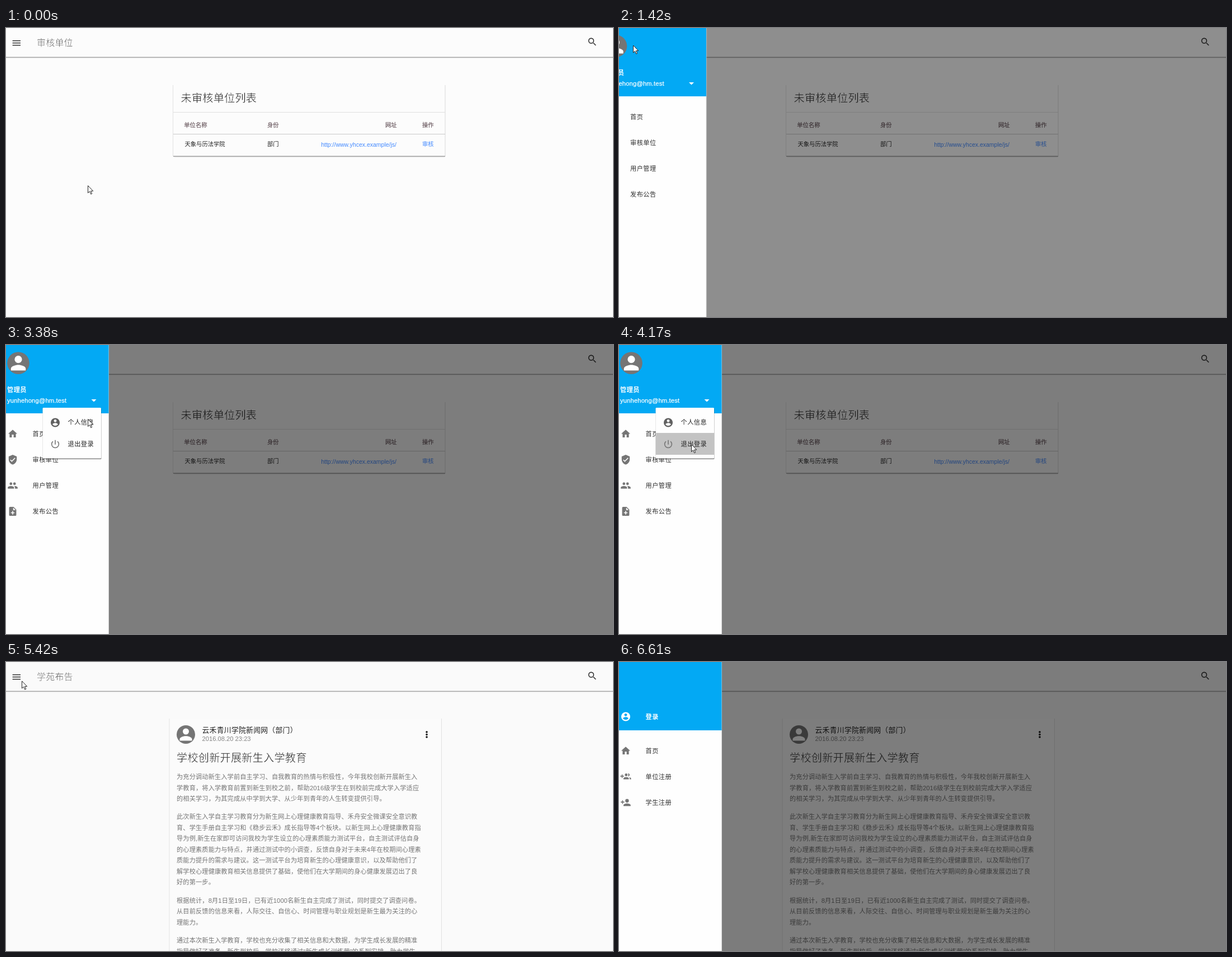
An HTML page for the animation above (7040 ms loop, 1085 by 516 pixels).

```html
<!DOCTYPE html>
<html lang="zh-CN">
<head>
<meta charset="utf-8">
<title>审核单位</title>
<style>
  html, body { margin: 0; width: 100%; height: 100%; overflow: hidden; background: #fcfcfc; }
  svg { display: block; width: 100vw; height: 100vh; }
  text { font-family: "Liberation Sans", "Noto Sans CJK SC", "Noto Sans CJK JP", sans-serif; white-space: pre; }
</style>
</head>
<body>
<svg id="stage" viewBox="0 0 1085 516" preserveAspectRatio="none"></svg>
<script>
const LOOP = 7040;

// Text is placed by the vertical centre of its glyphs.
const label = (x, y, size, str, fill, extra = '') =>
  `<text x="${x}" y="${y + size * 0.375}" font-size="${size}" fill="${fill}" ${extra}>${str}</text>`;
const rect = (x, y, w, h, fill, extra = '') =>
  `<rect x="${x}" y="${y}" width="${w}" height="${h}" fill="${fill}" ${extra}/>`;
const END = 'text-anchor="end"';
// A stroke in the paper colour thins the strokes of large titles.
const THIN = 'font-weight="300" letter-spacing=".2" stroke="#fcfcfc" stroke-width=".5"';
const NAV = 'letter-spacing=".45"';
const BOLD = 'font-weight="700" letter-spacing=".45"';

const person = '<circle cx="12" cy="8" r="4"/><path d="M4 20v-2c0-2.7 5.3-4 8-4s8 1.3 8 4v2z"/>';
const icons = {
  menu: '<path d="M3 6h18v2H3zM3 11h18v2H3zM3 16h18v2H3z"/>',
  search: '<circle cx="9.5" cy="9.5" r="5.5" fill="none" stroke="currentColor" stroke-width="2"/><path d="M14 15.5v-.8l.7-.7h.8l5 5-1.5 1.5z"/>',
  home: '<path d="M10 20v-6h4v6h5v-8h3L12 3 2 12h3v8z"/>',
  shield: '<path fill-rule="evenodd" d="M12 1L3 5v6c0 5.5 3.8 10.7 9 12 5.2-1.3 9-6.5 9-12V5zM10 17l-4-4 1.4-1.4 2.6 2.6 6.6-6.6L18 9z"/>',
  people: '<circle cx="8" cy="8" r="3"/><circle cx="16" cy="8" r="3"/><path d="M1 19v-2.5C1 14.2 5.7 13 8 13s7 1.2 7 3.5V19zM17 19v-2.5c0-1.5-.8-2.6-2-3.4 3-.4 8 1 8 3.4V19z"/>',
  note: '<path fill-rule="evenodd" d="M14 2H6q-2 0-2 2v16q0 2 2 2h12q2 0 2-2V8zM16 16h-3v3h-2v-3H8v-2h3v-3h2v3h3zM13 9V3.5L18.5 9z"/>',
  account: '<path fill-rule="evenodd" d="M12 2a10 10 0 1 0 .01 0zM12 5a3 3 0 1 1-.01 0zM6 16c0-2 4-3.1 6-3.1s6 1.1 6 3.1a7.2 7.2 0 0 1-12 0z"/>',
  power: '<path d="M11 3h2v10h-2z"/><path d="M6.9 5.9a8 8 0 1 0 10.2 0" fill="none" stroke="currentColor" stroke-width="2"/>',
  addGroup: '<path d="M3 7h2v3h3v2H5v3H3v-3H0v-2h3z"/><circle cx="13" cy="8" r="3"/><path d="M17 5.1a3 3 0 1 1 0 5.8q1.8-2.9 0-5.8zM7 18v-2c0-2 4-3 6-3s6 1 6 3v2zM19.6 13.2c2 .3 4.4 1.3 4.4 2.8v2h-3v-2q0-1.7-1.4-2.8z"/>',
  addPerson: `<path d="M4 7h2v3h3v2H6v3H4v-3H1v-2h3z"/><g transform="translate(3)">${person}</g>`
};
const icon = (name, cx, cy, color = '#757575', scale = 0.8) =>
  `<g transform="translate(${cx} ${cy}) scale(${scale}) translate(-12 -12)" fill="${color}" color="${color}">${icons[name]}</g>`;
const avatar = (cx, cy, r) =>
  `<g transform="translate(${cx} ${cy}) scale(${r / 12}) translate(-12 -12)"><circle cx="12" cy="12" r="12" fill="#757575"/><g fill="#fff">${person}</g></g>`;

const header = title =>
  rect(0, 51, 1085, 1, '#dcdcdc') + rect(0, 52, 1085, 1, '#a6a6a6') + rect(0, 53, 1085, 1, '#e6e6e6') +
  icon('menu', 18.8, 26.7, '#333') + label(55, 26, 16, title, '#505050', THIN) + icon('search', 1048, 24.8, '#333');

function reviewPage() {
  const cell = (x, y, str, fill, extra) => label(x, y, 10.3, str, fill, extra);
  const head = '#6b5a60', link = '#448aff', ink = '#222';
  const headEnd = `${END} stroke="${head}" stroke-width=".2"`;
  return rect(0, 0, 1085, 516, '#fcfcfc') + header('审核单位') +
    rect(298, 102, 1, 127, '#e2e2e2') + rect(784.5, 102, 1, 127, '#dadada') +
    rect(299, 150, 486, 1, '#e0e0e0') + rect(299, 189, 486, 1, '#c9c9c9') +
    rect(299, 228, 486, 1, '#c0c0c0') + rect(299, 229, 486, 1, '#adadad') + rect(301, 230, 483, 1, '#ececec') +
    label(312.5, 125, 19.2, '未审核单位列表', '#222', THIN) +
    cell(359.5, 172.7, '单位名称', head, headEnd) + cell(487.5, 172.7, '身份', head, headEnd) +
    cell(698.5, 172.7, '网址', head, headEnd) + cell(764.5, 172.7, '操作', head, headEnd) +
    cell(319.5, 207.6, '天象与历法学院', ink) + cell(487.5, 207.6, '部门', ink, END) +
    label(698, 207.6, 10.5, 'http://www.yhcex.example/js/', link, END) + cell(764.5, 207.6, '审核', link, END);
}

const article = [
  [205, `为充分调动新生入学前自主学习、自我教育的热情与积极性，今年我校创新开展新生入
学教育，将入学教育前置到新生到校之前，帮助2016级学生在到校前完成大学入学适应
的相关学习，为其完成从中学到大学、从少年到青年的人生转变提供引导。`],
  [276, `此次新生入学自主学习教育分为新生网上心理健康教育指导、禾舟安全微课安全意识教
育、学生手册自主学习和《稳步云禾》成长指导等4个板块。以新生网上心理健康教育指
导为例,新生在家即可访问我校为学生设立的心理素质能力测试平台，自主测试评估自身
的心理素质能力与特点，并通过测试中的小调查，反馈自身对于未来4年在校期间心理素
质能力提升的需求与建议。这一测试平台为培育新生的心理健康意识，以及帮助他们了
解学校心理健康教育相关信息提供了基础，使他们在大学期间的身心健康发展迈出了良
好的第一步。`],
  [425.5, `根据统计，8月1日至19日，已有近1000名新生自主完成了测试，同时提交了调查问卷。
从目前反馈的信息来看，人际交往、自信心、时间管理与职业规划是新生最为关注的心
理能力。`],
  [497, `通过本次新生入学教育，学校也充分收集了相关信息和大数据，为学生成长发展的精准
指导做好了准备。新生到校后，学校还将通过“新生成长训练营”的系列安排，助力学生`]
];

function homePage() {
  const body = article.map(([top, text]) => text.split('\n').map((line, i) =>
    label(305, top + i * 19.5, 11.2, line, '#757575', 'letter-spacing=".14"')).join('')).join('');
  const dots = [125, 129.5, 134].map(y => `<circle cx="752" cy="${y}" r="1.8" fill="#111"/>`).join('');
  return rect(0, 0, 1085, 516, '#fafafa') + header('学苑布告') +
    rect(292, 101, 486, 415, '#fbfbfb') + rect(291.5, 101, 1, 415, '#e4e4e4') + rect(778, 101, 1, 415, '#e0e0e0') +
    avatar(321.5, 129.5, 16.5) +
    label(350.5, 121, 12.8, '云禾青川学院新闻网（部门）', '#222', 'letter-spacing=".3"') +
    label(350.5, 136.5, 11.2, '2016.08.20 23:23', '#858585') + dots +
    label(305, 170.5, 19.2, '学校创新开展新生入学教育', '#222', THIN) + body;
}

const navItem = ([name, str], i) =>
  icon(name, 12, 158.5 + i * 46.2) + label(47.5, 158.3 + i * 46.2, 11.2, str, '#303030', NAV);
const drawerBase = items =>
  rect(-40, 0, 223.5, 516, '#fefefe') + rect(183, 0, 1, 516, '#d8d8d8') +
  rect(-40, 0, 223.5, 122, '#03a9f4') + items.map(navItem).join('');

const adminDrawer = drawerBase([['home', '首页'], ['shield', '审核单位'], ['people', '用户管理'], ['note', '发布公告']]) +
  avatar(22, 32.3, 19.8) +
  label(2, 79.5, 11.2, '管理员', '#fff', BOLD) +
  label(2, 98.8, 11.2, 'yunhehong@hm.test', '#fff', 'letter-spacing=".17" stroke="#fff" stroke-width=".25"') +
  '<circle id="buttonRipple" cx="156" cy="98.5" r="12" fill="#1a78a0"/><path id="arrow" d="M152.5 97h9l-4.5 4.5z" fill="#fff"/>';
const guestDrawer = drawerBase([['home', '首页'], ['addGroup', '单位注册'], ['addPerson', '学生注册']]) +
  icon('account', 12, 97.5, '#fff') + label(47.5, 97.5, 11.2, '登录', '#fff', BOLD);

const menu =
  rect(65, 113, 106, 91, '#000', 'rx="1.5" opacity=".18"') + rect(66, 113, 104, 91, '#000', 'rx="1.5" opacity=".35"') +
  rect(65.5, 112, 104.5, 90.5, '#fefefe', 'rx="1.5"') +
  rect(65.5, 157, 104.5, 39, '#eee', 'id="hoverRow"') +
  '<circle id="rowRipple" cx="129" cy="177" r="0" fill="#c3c3c3" clip-path="url(#rowClip)"/>' +
  icon('account', 88, 138.5, '#616161') + label(110.5, 138, 11.2, '个人信息', '#222', NAV) +
  icon('power', 88, 177, '#757575') + label(110.5, 177, 11.2, '退出登录', '#222', NAV);

document.getElementById('stage').innerHTML = `
  <defs>
    <clipPath id="rowClip">${rect(65.5, 157, 104.5, 39, '#000')}</clipPath>
    <clipPath id="menuClip"><rect id="menuWindow" y="110"/></clipPath>
  </defs>
  <g id="review">${reviewPage()}</g>
  <g id="home">${homePage()}</g>
  ${rect(0, 0, 1085, 516, '#000', 'id="shade"')}
  <g id="admin">${adminDrawer}</g>
  <g id="guest">${guestDrawer}</g>
  <g id="menu" clip-path="url(#menuClip)">${menu}</g>
  <g id="pointer" fill="#fff" stroke="#222" stroke-width="1" stroke-linejoin="round">
    <path id="arrowShape" d="M.5.5v13l3-2.8 2.2 5 2-.9-2.1-4.7h4.1z"/>
    <path id="handShape" d="M-1.5 9.5V2a1.5 1.5 0 0 1 3 0v5l4.2 1q1.5.5 1.3 2L6 15.5l-1 3.5h-6l-1.5-3.5-3-3.5q0-2 2-1.4l2 1.6z"/>
  </g>`;

const $ = Object.fromEntries([...document.querySelectorAll('[id]')].map(el => [el.id, el]));

// Tracks hold each state until the next entry: [time, ...values].
const pointerTrack = [
  [0, 146, 281], [400, 107, 155], [520, 80, 78], [670, 61, 28], [820, 25, 30.5],
  [1820, 25, 40], [1970, 70, 72], [2090, 125, 102], [2240, 155, 100],
  [3260, 152, 112], [3380, 146, 132], [3500, 135, 160], [3620, 129, 177],
  [4590, 105, 148], [4710, 72, 110], [4840, 40, 73], [4990, 27, 38], [5110, 23, 42], [5270, 28, 33.5],
  [6010, 130, 90], [6130, 330, 195], [6250, 560, 310], [6370, 800, 430], [6490, 987, 505], [6610, 1100, 540]
];
const drawerTrack = [[0, -240, 0], [1420, -27.5, 0.44], [1540, 0, 0.5], [4320, -240, 0], [5570, -27.5, 0.44], [5700, 0, 0.5]];
const buttonTrack = [[0, 0, 0], [2240, 12, 0.25], [2480, 7, 1], [2600, 10, 1], [2720, 12, 1], [3020, 12, 0.5], [3140, 0, 0]];
const menuTrack = [[0, 0], [3020, 0.35], [3140, 0.8], [3260, 1], [4320, 0]];
const rowTrack = [[0, 0], [4020, 52], [4170, 130]];

const at = (track, t) => track.filter(key => key[0] <= t).pop().slice(1);
const show = (el, on) => el.setAttribute('display', on ? 'inline' : 'none');
const set = (el, attrs) => Object.entries(attrs).forEach(([k, v]) => el.setAttribute(k, v));

function draw(t) {
  const loggedOut = t >= 4320;
  show($.review, !loggedOut);
  show($.home, loggedOut);

  const [shift, dim] = at(drawerTrack, t);
  set($.shade, { opacity: dim });
  for (const drawer of [$.admin, $.guest]) set(drawer, { transform: `translate(${shift})` });
  show($.admin, !loggedOut);
  show($.guest, loggedOut);

  const [radius, strength] = at(buttonTrack, t);
  set($.buttonRipple, { r: radius, opacity: strength });
  set($.arrow, { opacity: strength === 1 ? 0.6 : 1 });

  const [open] = at(menuTrack, t);
  show($.menu, open > 0);
  set($.menuWindow, { x: 172 - 108 * open, width: 108 * open, height: 96 * open });
  show($.hoverRow, t >= 3500);
  set($.rowRipple, { r: at(rowTrack, t)[0] });

  const [x, y] = at(pointerTrack, t);
  const overButton = t >= 2240 && t < 3260;
  set($.pointer, { transform: `translate(${x} ${y})` });
  show($.handShape, overButton);
  show($.arrowShape, !overButton);
}

const start = performance.now();
function tick() {
  draw((performance.now() - start) % LOOP);
  requestAnimationFrame(tick);
}
tick();
</script>
</body>
</html>
```
